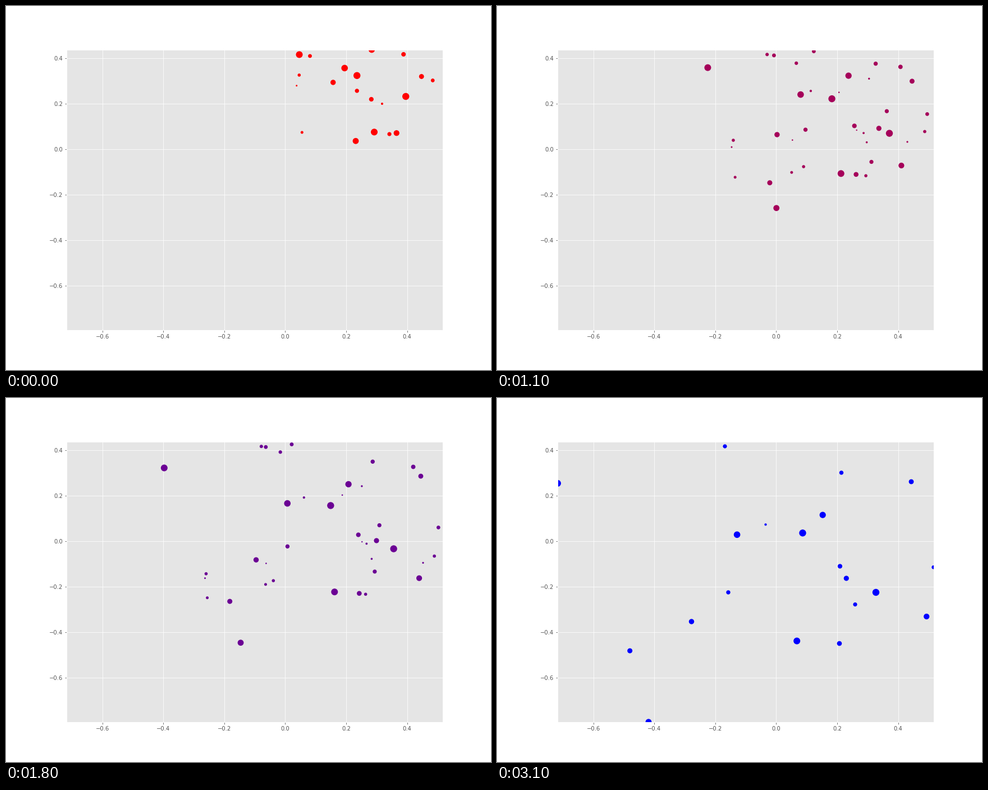
Write a matplotlib script that moves like this. It is 864x648 px and loops after 3.2 s.

```python
import numpy as np
import matplotlib.pyplot as plt
from matplotlib.animation import FuncAnimation

FRAMES = 32
DPI = 72
XLIM = (-0.71755, 0.51617)
YLIM = (-0.7947, 0.4370)
# axes edges on the stage, in pixels from the top left
LEFT, RIGHT, TOP, BOTTOM = 108.0, 777.6, 77.76, 576.72
EPS = 1e-9

plt.rcParams.update({
    "font.family": "DejaVu Sans", "font.size": 10,
    "axes.facecolor": "#E5E5E5", "axes.edgecolor": "white",
    "axes.linewidth": 1, "axes.grid": True, "axes.axisbelow": True,
    "grid.color": "white", "grid.linestyle": "-", "grid.linewidth": 0.8,
    "xtick.color": "#555555", "ytick.color": "#555555",
})

# two weighted point clouds: x, y on the stage and mass
red = [
    (522.5, 86.5, 130.4), (541.5, 89, 28.1), (522.3, 123, 16.8),
    (517.7, 141.8, 2.2), (603.2, 110.5, 131.4), (582.7, 136, 62.4),
    (625.2, 123.8, 120), (625.2, 151, 36), (651.5, TOP, 122.2),
    (708.2, 86, 78.1), (740.2, 125.5, 86.6), (760.2, 132.5, 44.5),
    (712.2, 161, 180.3), (650.8, 166, 44.9), (670, 174, 9.7),
    (527.3, 225, 12.2), (623, 240.3, 154.9), (656, 224.4, 177.4),
    (683, 228, 49.3), (695.7, 226.2, 75.7),
]
blue = [
    (LEFT, 151.9, 110.2), (406, 86, 98.5), (613.5, 133, 34.8),
    (738, 149, 93), (580.2, 208.2, 98.9), (544.5, 240.3, 118.8),
    (427.6, 243.3, 102), (478.5, 225.3, 7.3), (611, 299.5, 77.4),
    (622.3, 321, 64.6), (675, 346, 118.8), (412, 346, 34.8),
    (638, 367.5, 36.9), (RIGHT, 301.3, 26.8), (765.2, 389, 96.4),
    (346.5, 398, 92.6), (236.7, 450, 87.4), (534.2, 432.5, 110.2),
    (610, 437, 67.2), (270, BOTTOM, 86.5),
]


def cloud(rows):
    px, py, mass = np.array(rows, float).T
    x = np.interp(px, (LEFT, RIGHT), XLIM)
    y = np.interp(py, (TOP, BOTTOM), YLIM[::-1])
    return np.column_stack((x, y)), mass


def cheapest_path(cost, flow, start, need):
    """Shortest residual path from a row to a column that still needs mass."""
    rows, cols = cost.shape
    drow, dcol = np.full(rows, np.inf), np.full(cols, np.inf)
    from_col, from_row = np.zeros(rows, int), np.zeros(cols, int)
    drow[start] = 0
    for _ in range(rows + cols):
        via = drow[:, None] + cost
        better = via.min(0) < dcol - EPS
        dcol[better] = via.min(0)[better]
        from_row[better] = via.argmin(0)[better]
        back = np.where(flow > EPS, dcol - cost, np.inf)
        better = back.min(1) < drow - EPS
        if not better.any():
            break
        drow[better] = back.min(1)[better]
        from_col[better] = back.argmin(1)[better]

    end = col = int(np.argmin(np.where(need > EPS, dcol, np.inf)))
    forward, backward = [(from_row[col], col)], []
    while forward[-1][0] != start:
        row = forward[-1][0]
        col = from_col[row]
        backward.append((row, col))
        forward.append((from_row[col], col))
    return end, forward, backward


def transport(cost, supply, demand):
    """Optimal transport plan by successive shortest paths."""
    flow = np.zeros_like(cost)
    need = demand * supply.sum() / demand.sum()
    for i, left in enumerate(supply):
        while left > 1e-6:
            end, forward, backward = cheapest_path(cost, flow, i, need)
            push = min([left, need[end]] + [flow[e] for e in backward])
            for edge in forward:
                flow[edge] += push
            for edge in backward:
                flow[edge] -= push
            need[end] -= push
            left -= push
    return flow


p, supply = cloud(red)
q, demand = cloud(blue)
cost = ((p[:, None] - q[None]) ** 2).sum(-1)
plan = transport(cost, supply, demand)
src, dst = np.nonzero(plan > 0.1)
a, b = p[src], q[dst]

fig, ax = plt.subplots(figsize=(864 / DPI, 648 / DPI), dpi=DPI)
fig.subplots_adjust(left=0.125, right=0.9, bottom=0.11, top=0.88)
dots = ax.scatter(a[:, 0], a[:, 1], s=plan[src, dst], color="red",
                  linewidths=1.5)
ax.set_xlim(XLIM)
ax.set_ylim(YLIM)


def update(frame):
    t = frame / (FRAMES - 1)
    dots.set_offsets((1 - t) * a + t * b)
    dots.set_color((1 - t, 0, t))
    return (dots,)


anim = FuncAnimation(fig, update, frames=FRAMES, interval=100,
                     init_func=lambda: update(0), repeat=True, repeat_delay=0)
plt.show()
```
